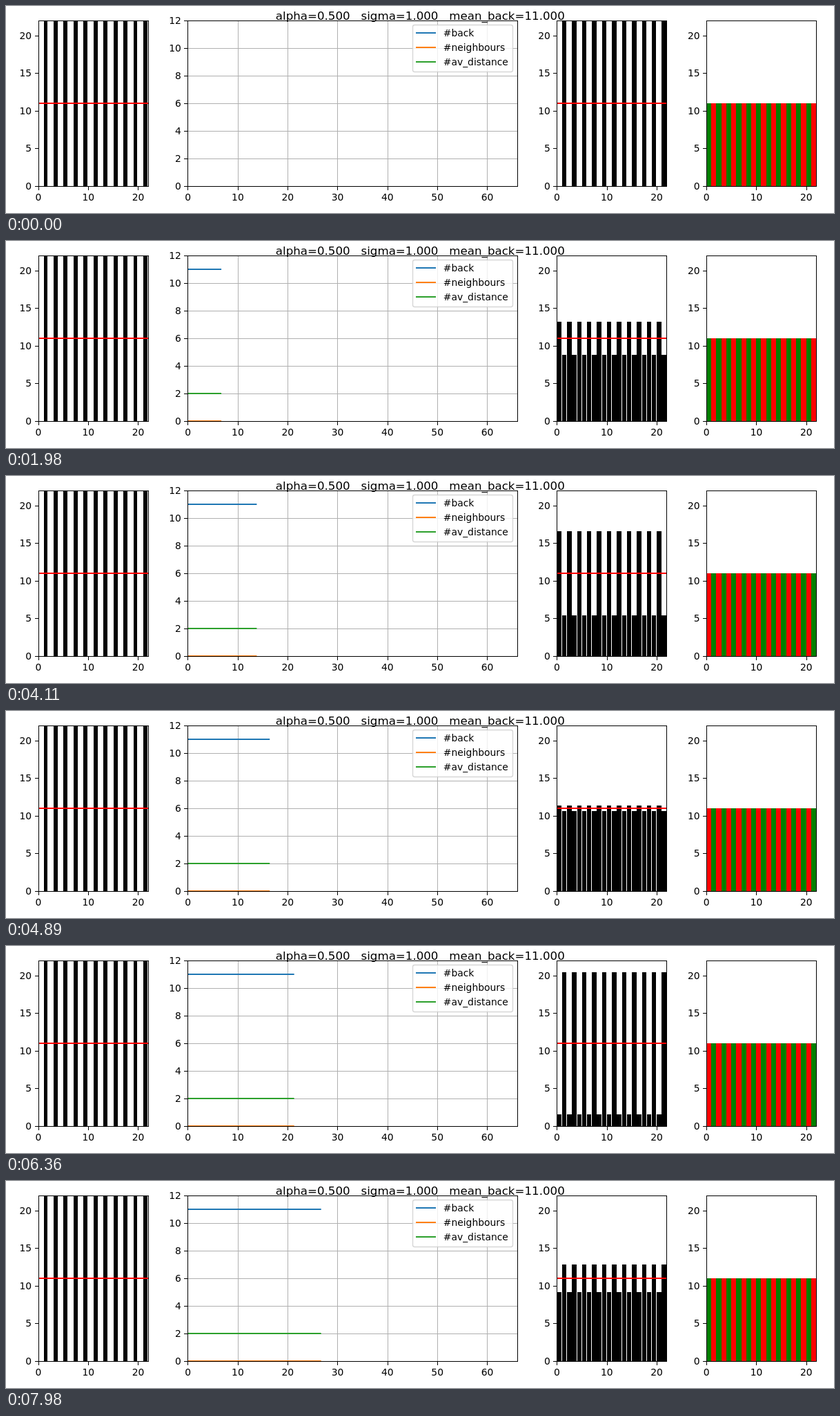
Write an HTML page that moves like this. It is 1200 px wide and 300 px high and loops after 8 s.

```html
<!DOCTYPE html>
<html lang="en">
<head>
<meta charset="utf-8">
<title>Alternating bars</title>
<style>
  html, body { margin: 0; width: 100%; height: 100%; overflow: hidden; background: #fff; }
  svg { display: block; font: 13.89px "DejaVu Sans", sans-serif; }
  text { white-space: pre; }
  .title { font-size: 16.67px; }
</style>
</head>
<body>
<svg id="stage" width="1200" height="300" viewBox="0 0 1200 300"></svg>
<script>
const STEP = 30, LOOP = 8000;
const TOP = 21, BASE = 261, UNIT = 7.2305;   // UNIT: pixels per x unit in every panel
const COUNT = 22, HALF = 110;                // bars per panel, steps from floor to ceiling
const LEFT = { target: 46.6, chart: 263.34, state: 798.22, trend: 1014.96 };
const SERIES = [
  ['#back', 11, '#1f77b4'],
  ['#neighbours', 0, '#ff7f0e'],
  ['#av_distance', 2, '#2ca02c']
];

const stage = document.getElementById('stage');
const yOf = (value, max) => Math.round(BASE - value * (BASE - TOP) / max);
const range = (max, step) => Array.from({ length: Math.floor(max / step) + 1 }, (_, i) => i * step);

const rect = (x, y, w, h, fill, extra = '') =>
  `<rect x="${x}" y="${y}" width="${w}" height="${h}" fill="${fill}" ${extra}/>`;
const text = (x, y, label, anchor = 'middle', extra = '') =>
  `<text x="${x}" y="${y}" text-anchor="${anchor}" ${extra}>${label}</text>`;

// Outline of every second bar, starting with bar `first`
function barPath(left, first, width, height) {
  const y = yOf(height, 22), pad = (1 - width) / 2;
  let d = '';
  for (let i = first; i < COUNT; i += 2) {
    const a = Math.round(left + (i + pad) * UNIT);
    const b = Math.round(left + (i + 1 - pad) * UNIT);
    d += `M${a} ${y}H${b}V${BASE}H${a}z`;
  }
  return d;
}

// Frame, ticks and labels around some content
function panel(left, xMax, yMax, yStep, content, grid) {
  const x0 = Math.round(left), x1 = Math.round(left + xMax * UNIT);
  let lines = '', ticks = '', labels = '';
  for (const v of range(xMax, 10)) {
    const x = Math.round(left + v * UNIT);
    if (grid) lines += rect(x, TOP, 1, BASE - TOP, '#b0b0b0');
    ticks += rect(x, BASE + 1, 1, 5, '#000');
    labels += text(left + v * UNIT + 0.3, 282, v);
  }
  for (const v of range(yMax, yStep)) {
    const y = yOf(v, yMax);
    if (grid) lines += rect(x0, y, x1 - x0, 1, '#b0b0b0');
    ticks += rect(x0 - 5, y, 5, 1, '#000');
    labels += text(left - 9.4, y + 5, v, 'end');
  }
  return lines + content + ticks +
    rect(x0 + 0.5, TOP + 0.5, x1 - x0, BASE - TOP, 'none', 'stroke="#000"') + labels;
}

const redLine = left =>
  rect(Math.round(left), 140, Math.round(left + COUNT * UNIT) - Math.round(left), 2, 'red');

function legend() {
  let out = rect(589.5, 27.5, 145, 68, '#fff',
    'fill-opacity=".8" rx="2.8" stroke="#ccc" stroke-opacity=".8" stroke-width="1.39"');
  SERIES.forEach(([name, , color], i) => {
    const y = 39 + 21 * i;
    out += rect(594, y - 1, 29, 2, color) + text(633.8, y + 5, name, 'start');
  });
  return out;
}

const curves = SERIES.map(([, value, color]) =>
  rect(264, yOf(value, 12) - 1, 0, 2, color, 'class="curve"')).join('');

stage.innerHTML =
  panel(LEFT.target, 22, 22, 5,
    `<path d="${barPath(LEFT.target, 1, 0.8, 22)}"/>` + redLine(LEFT.target)) +
  panel(LEFT.chart, 66, 12, 2, curves, true) + legend() +
  panel(LEFT.state, 22, 22, 5,
    '<path id="even"/><path id="odd"/>' + redLine(LEFT.state)) +
  panel(LEFT.trend, 22, 22, 5, [0, 1].map(k =>
    `<path class="trend" d="${barPath(LEFT.trend, k, 1, 11)}"/>`).join('')) +
  text(600.3, 20, 'alpha=0.500   sigma=1.000   mean_back=11.000', 'middle', 'class="title"');

const even = document.getElementById('even'), odd = document.getElementById('odd');
const curveRects = stage.querySelectorAll('.curve');
const trends = stage.querySelectorAll('.trend');

function draw() {
  const n = Math.floor(performance.now() % LOOP / STEP);
  const phase = n % (2 * HALF), rising = phase < HALF;
  const height = 0.2 * (rising ? phase : 2 * HALF - phase);

  even.setAttribute('d', barPath(LEFT.state, 0, 0.9, height));
  odd.setAttribute('d', barPath(LEFT.state, 1, 0.9, 22 - height));
  trends[0].setAttribute('fill', rising ? 'green' : 'red');
  trends[1].setAttribute('fill', rising ? 'red' : 'green');

  // The stroke's square cap reaches one pixel past the last point
  const length = n ? LEFT.chart + 0.1 * n * UNIT + 1.04 - 264 : 0;
  curveRects.forEach(r => r.setAttribute('width', length));
  requestAnimationFrame(draw);
}
draw();
</script>
</body>
</html>
```
